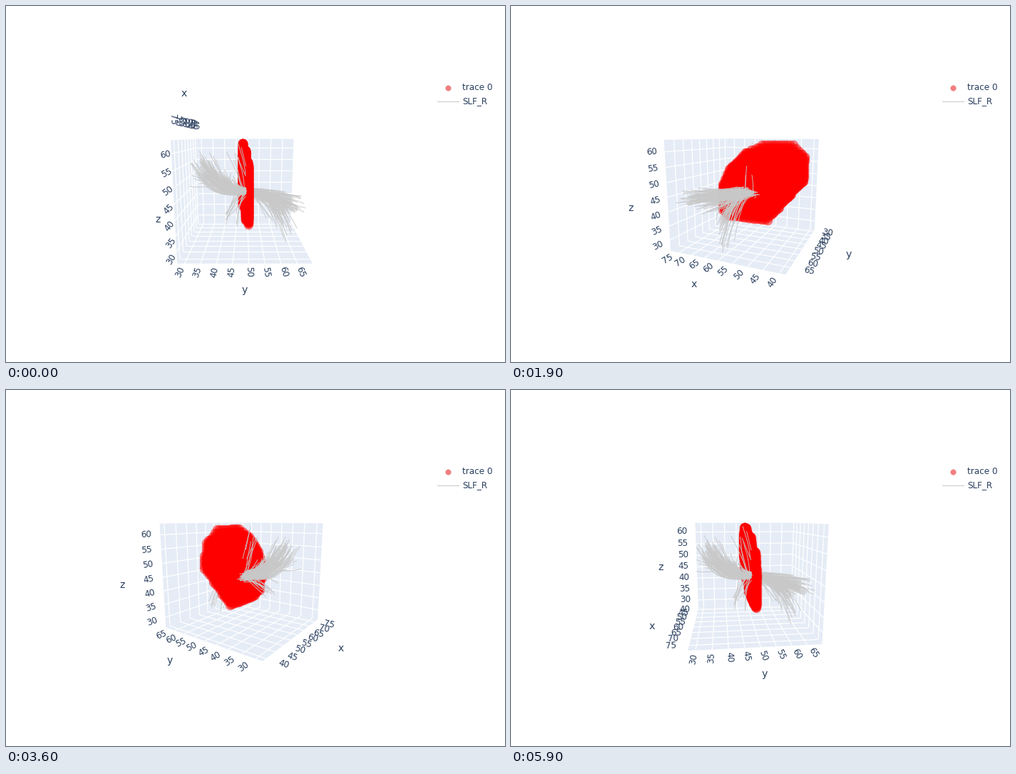
Animation of 700 by 500 pixels, one loop 6 s. Source, as a matplotlib script:

```python
import numpy as np
import matplotlib
import matplotlib.pyplot as plt
from matplotlib.animation import FuncAnimation
from matplotlib.collections import LineCollection

matplotlib.rcParams["font.family"] = "DejaVu Sans"

W, H, DPI = 700, 500, 100
PX = 72 / DPI
FRAMES, INTERVAL = 60, 100
INK, WALL, FIBRE = "#2a3f5f", "#e5ecf6", "#c8c8c8"

# scene: data centre, scale and half sizes of the box
MID = np.array([58.35, 48.75, 44.95])
UNIT = np.array([0.0255, 0.025, 0.025])
HALF = np.array([0.514, 0.526, 0.4715])
TICKS = [np.arange(40, 80, 5), np.arange(30, 70, 5), np.arange(30, 65, 5)]
TICK_PAD, TITLE_PAD = 0.143, 0.385
TEXT_LIFT = 0.8

# camera
CX, CY, FOCAL = 335, 260, 386
EYE_R, EYE_Z = 2.5, 0.5
PITCH = np.arctan2(EYE_Z, EYE_R)

CORNERS = np.array([[(i >> k & 1) * 2 - 1 for k in range(3)]
                    for i in range(8)]) * HALF


def project(p, turn):
    """Scene points to stage pixels, plus their depth."""
    p = np.asarray(p, float)
    c, s = np.cos(turn), np.sin(turn)
    side = p[..., 1] * c - p[..., 0] * s
    ahead = EYE_R - p[..., 0] * c - p[..., 1] * s
    rise = p[..., 2] - EYE_Z
    depth = ahead * np.cos(PITCH) - rise * np.sin(PITCH)
    up = ahead * np.sin(PITCH) + rise * np.cos(PITCH)
    xy = np.stack([CX + FOCAL * side / depth, CY - FOCAL * up / depth], -1)
    return xy, depth


def tick_pos(axis):
    return (TICKS[axis] - MID[axis]) * UNIT[axis]


def grow_bundle(rng, count, reach, bend):
    """Fibres leaving the core for reach; a higher bend turns later."""
    t = np.linspace(0, 1, 26)[:, None]
    fibres = []
    for _ in range(count):
        core = rng.normal(0, (0.045, 0.04, 0.014))
        core[2] += 0.2 * core[0]
        tip = np.clip(rng.normal(size=3), -2, 2) * (0.055, 0.045, 0.042)
        s = t * rng.uniform(0.75, 1.05)
        path = s ** (1.5, 1, bend) * reach + core * (1 - s) + tip * s
        path += rng.normal(0, 0.01, 3) * np.sin(6 * s + rng.uniform(0, 6)) * s
        fibres.append(np.stack([path[:-1], path[1:]], 1))
    return np.concatenate(fibres)


def grow_fibres():
    rng = np.random.default_rng(7)
    bundles = [
        (100, (.08, -.36, .28), 3),     # rising arm
        (25, (.12, -.20, .16), 2),
        (95, (.40, .40, -.04), 1.5),    # level arm
        (34, (.08, .40, -.36), 3),      # drooping arm
        (16, (.28, .30, -.18), 1.5),
        (12, (.27, -.16, -.20), 1.5),
        (7, (-.02, -.10, .40), 1),
        (8, (.12, -.46, .14), 1),
    ]
    return np.concatenate([grow_bundle(rng, *b) for b in bundles])


def fill_slab():
    """Voxel centres of the thin, slightly leaning red sheet."""
    x, y, z = [g.ravel() for g in np.meshgrid(
        np.arange(39, 70), np.arange(48, 51), np.arange(35, 63))]
    shoulder = (np.maximum(x - 52, 0) / 17.5) ** 1.6 \
        + (np.maximum(z - 45, 0) / 17.5) ** 1.6
    keep = shoulder <= 1
    keep &= (x - 39) / 12 + (z - 35) / 15 >= 1
    keep &= (x - z <= 32) & (z - x <= 19)
    keep &= abs(z - 53 + 5 * (y - 48)) <= 11
    return (np.column_stack([x, y, z])[keep] - MID) * UNIT


FIBRES = grow_fibres()
SLAB = fill_slab()
SLAB_Y = 0.008
HIGH_Y = FIBRES[:, :, 1].mean(1) > SLAB_Y


def box_layout(turn):
    """Far corner of the box and, per axis, a corner on its labelled edge."""
    xy, depth = project(CORNERS, turn)
    far = int(np.argmax(np.round(depth, 6)))
    near = 7 ^ far
    low = np.round(xy[:, 1], 5)
    low[[far, near]] = -1
    bottom = int(np.argmax(low))
    ends = [bottom ^ b for b in (1, 2, 4) if bottom ^ b not in (far, near)]
    left, right = sorted(ends, key=lambda i: xy[i, 0])
    edges = {left ^ bottom: bottom, right ^ bottom: bottom}
    vert, other = right ^ 7, left
    if vert in (far, near):
        vert, other = left ^ 7, right
    edges[other ^ vert] = vert
    return far, [edges[1 << k] for k in range(3)]


fig = plt.figure(figsize=(W / DPI, H / DPI), dpi=DPI, facecolor="white")
ax = fig.add_axes([0, 0, 1, 1])
ax.set_xlim(0, W)
ax.set_ylim(H, 0)
ax.axis("off")

walls = [ax.fill([0] * 4, [0] * 4, color=WALL, lw=0, zorder=0)[0]
         for _ in range(3)]


def add_lines(color, width, z):
    return ax.add_collection(
        LineCollection([], colors=color, linewidths=width * PX, zorder=z),
        autolim=False)


grid = add_lines("white", 1.25, 1)
behind = add_lines(FIBRE, 0.9, 2)
slab = ax.scatter([], [], s=(13.5 * PX) ** 2, c="red", alpha=0.5, lw=0,
                  zorder=3)
before = add_lines(FIBRE, 0.9, 4)


def add_text(label, size):
    return ax.text(0, 0, label, fontsize=size * PX, color=INK,
                   ha="center", va="center", zorder=5)


numbers = [[add_text(str(v), 12) for v in ticks] for ticks in TICKS]
titles = [add_text(name, 14) for name in "xyz"]

# legend
ax.plot([620], [114.5], "o", ms=7.5 * PX, mfc="#f67e7e", mec="#e08080",
        mew=0.5 * PX)
ax.plot([605, 635], [133.5, 133.5], color=FIBRE, lw=1 * PX)
for label, base in [("trace 0", 118.5), ("SLF_R", 137.5)]:
    ax.text(640, base, label, fontsize=12 * PX, color=INK, va="baseline")


def draw_walls(far, turn):
    lines = []
    for k in range(3):
        i, j = [n for n in range(3) if n != k]
        a, b = 1 << i, 1 << j
        quad = CORNERS[[far, far ^ a, far ^ a ^ b, far ^ b]]
        walls[k].set_xy(project(quad, turn)[0])
        for u, v in [(i, j), (j, i)]:
            for t in tick_pos(u):
                ends = np.array([CORNERS[far], CORNERS[far]])
                ends[:, u] = t
                ends[:, v] = [-HALF[v], HALF[v]]
                lines.append(ends)
    grid.set_segments(project(np.array(lines), turn)[0])


def draw_labels(far, edges, turn):
    for k, corner in enumerate(edges):
        # labels move out along the axis that points away from the far corner
        out = next(n for n in range(3)
                   if n != k and (corner ^ far) >> n & 1)
        push = np.zeros(3)
        push[out] = np.sign(CORNERS[corner, out])
        base = np.tile(CORNERS[corner], (len(TICKS[k]), 1))
        base[:, k] = tick_pos(k)
        start = project(base, turn)[0]
        spot = project(base + push * TICK_PAD, turn)[0]
        for text, p, q in zip(numbers[k], start, spot):
            dx, dy = q - p
            angle = np.degrees(np.arctan2(-dy, dx))
            text.set_position((q[0], q[1] - TEXT_LIFT))
            text.set_rotation((angle + 90) % 180 - 90)
        middle = CORNERS[corner].copy()
        middle[k] = 0
        x, y = project(middle + push * TITLE_PAD, turn)[0]
        titles[k].set_position((x, y - TEXT_LIFT))


def update(frame):
    turn = 2 * np.pi * frame / FRAMES
    far, edges = box_layout(turn)
    draw_walls(far, turn)
    draw_labels(far, edges, turn)
    slab.set_offsets(project(SLAB, turn)[0])
    fibres = project(FIBRES, turn)[0]
    in_front = HIGH_Y == (EYE_R * np.sin(turn) > SLAB_Y)
    behind.set_segments(fibres[~in_front])
    before.set_segments(fibres[in_front])
    return []


anim = FuncAnimation(fig, update, frames=FRAMES, interval=INTERVAL,
                     repeat=True, repeat_delay=0, blit=False)
plt.show()
```
